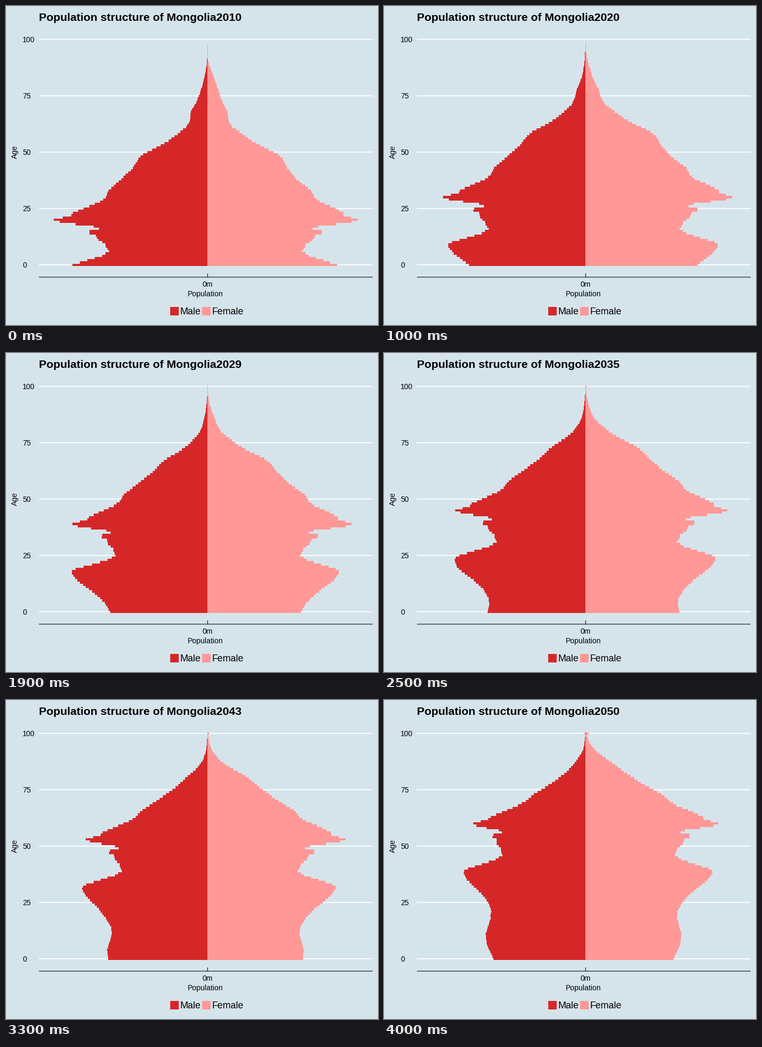
These frames come from a looping animation (700x600 px, 4100 ms). A matplotlib script:

```python
import numpy as np
import matplotlib.pyplot as plt
from matplotlib.animation import FuncAnimation
from matplotlib.patches import Polygon, Rectangle

W, H, DPI = 700, 600, 100
START, YEARS = 2010, 41
ZERO_X, ZERO_Y, ROW = 379, 486.75, 4.24
LEFT, RIGHT = 62, 690
BACK, RED, PINK = "#d5e4eb", "#d62728", "#ff9896"

AGES = np.arange(101)

# Key points of the male bar length in pixels: by age in the first year,
# and for newborns by years after it
MEN = [(0, 254), (4, 198), (6, 185), (8, 191), (9, 192), (11, 205), (13, 210),
       (14, 222), (15, 222), (16, 204), (17, 214), (18, 248), (19, 278), (20, 289),
       (22, 256), (23, 253), (28, 202), (30, 191), (33, 186), (37, 167), (43, 140),
       (47, 130), (49, 121), (52, 96), (55, 73), (61, 40), (64, 33), (68, 31),
       (73, 19), (79, 10), (85, 4), (90, 0.6), (100, 0)]
BOYS = [(1, 260), (2, 260), (5, 249), (11, 213), (15, 194), (19, 183), (22, 181),
        (29, 189), (34, 186), (40, 173)]
# Women per man by age
RATIO = [(0, 0.962), (14, 0.967), (20, 0.978), (25, 1.034), (31, 1.056), (38, 1.03),
         (44, 1.08), (52, 1.11), (60, 1.18), (69, 1.23), (75, 1.48), (90, 2.6)]


def along(points, x):
    return np.interp(x, *zip(*points))


def loss(t, level, fall, slope, steepen, leave):
    """Yearly loss rate: deaths grow with age and fall with time, young adults move away."""
    age, year = AGES + 0.5, t + 0.5
    deaths = level * np.exp((slope + steepen * year) * (age - 83) - fall * year)
    moves = np.where(age > 19, leave * np.exp((19 - age) / 10), 0)
    return deaths + moves + 0.0005


def project(size, births, **rates):
    """Age the population year by year; the last bar keeps everyone over 100."""
    years = [size]
    for t in range(YEARS - 1):
        kept = years[-1] * np.exp(-loss(t, **rates))
        size = np.r_[births[t], kept[:-1]]
        size[-1] += kept[-1]
        years.append(size)
    return years


men = along(MEN, AGES)
boys = along(BOYS, np.arange(1, YEARS))
male = project(men, boys, level=0.14, fall=0.0094,
               slope=0.0672, steepen=0.00043, leave=0.0082)
female = project(men * along(RATIO, AGES), boys * RATIO[0][1], level=0.105, fall=0.016,
                 slope=0.0871, steepen=0.00015, leave=0.002)

EDGES = np.round(ZERO_Y + ROW / 2 - ROW * np.arange(102))
STEP_Y = np.repeat(EDGES, 2)[1:-1]


def outline(size, side):
    x = ZERO_X + side * np.repeat(np.round(size), 2)
    return np.column_stack([np.r_[ZERO_X, x, ZERO_X],
                            np.r_[STEP_Y[0], STEP_Y, STEP_Y[-1]]])


fig = plt.figure(figsize=(W / DPI, H / DPI), dpi=DPI, facecolor=BACK)
ax = fig.add_axes([0, 0, 1, 1])
ax.set_xlim(0, W)
ax.set_ylim(H, 0)
ax.axis("off")


def pt(px):
    return px * 72 / DPI


def label(x, y, text, px=14, **style):
    return ax.text(x, y, text, fontsize=pt(px), family="Liberation Sans",
                   color="black", va="baseline", **style)


def line(xs, ys, px, color, z):
    ax.plot(xs, ys, lw=pt(px), color=color, zorder=z, snap=False,
            solid_capstyle="butt")


def block(x, color):
    ax.add_patch(Rectangle((x, 566), 16, 16, fc=color, lw=0, antialiased=False))


for age in range(0, 101, 25):
    y = ZERO_Y - ROW * age
    line([LEFT, RIGHT], [y, y], 1.87, "white", 1)
    label(31, y + 5.25, str(age))

line([LEFT, RIGHT], [510, 510], 1.07, "black", 3)
line([379.4, 379.4], [503, 510], 1.07, "black", 3)
label(379, 528, "0m", ha="center")
label(375.7, 546, "Population", ha="center")
label(21, 274.5, "Age", ha="center", rotation=90, rotation_mode="anchor")

block(309, RED)
block(369, PINK)
label(327.5, 580, "Male", 17.9)
label(387.5, 580, "Female", 17.9)

title = label(62, 28, "", 21.33, weight="bold")
bars = [Polygon(outline(AGES, 1), fc=c, lw=0, antialiased=False, zorder=2)
        for c in (RED, PINK)]
for bar in bars:
    ax.add_patch(bar)


def draw(t):
    title.set_text(f"Population structure of Mongolia{START + t}")
    # even the smallest group of women shows as a hairline
    thin = AGES <= 97 + t / 6
    bars[0].set_xy(outline(male[t], -1))
    bars[1].set_xy(outline(np.maximum(female[t], thin), 1))
    return [title, *bars]


anim = FuncAnimation(fig, draw, frames=YEARS, interval=100, repeat=True)
plt.show()
```
